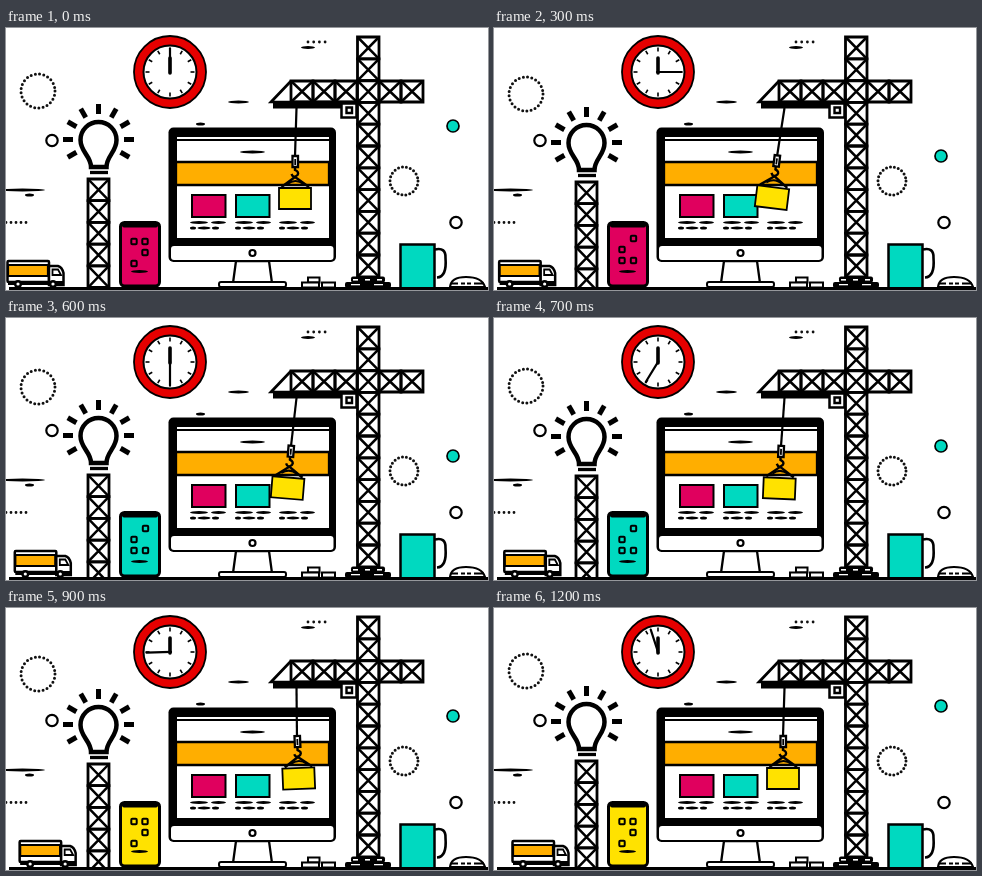
Write an HTML page with a canvas that moves like this. It is 482x262 px and loops after 1.3 s.

```html
<!DOCTYPE html>
<html lang="en">
<head>
<meta charset="utf-8">
<title>Under construction</title>
<style>
html, body { margin: 0; width: 100%; height: 100%; overflow: hidden; background: #fff; }
canvas { display: block; }
</style>
</head>
<body>
<canvas id="stage" width="482" height="262"></canvas>
<script>
const ctx = document.getElementById('stage').getContext('2d');
const INK = '#000', PINK = '#e0005e', TEAL = '#00d9c0', YELLOW = '#ffe200', ORANGE = '#ffae00', RED = '#e60000';
const STEP = 100, STEPS = 13, TAU = Math.PI * 2, RAD = Math.PI / 180;

// Values at every second step; the steps between are interpolated.
const HAND = [0, 64, 116, 180, 243, 294, 342];
const SWING = [0, 4.7, 9.3, 4.7, 0, -4.7, 0];
const DRIVE = [0, 2.3, 5, 7.3, 10.3, 14, 17];
const at = (keys, i) => {
  const k = Math.floor(i / 2);
  return i % 2 ? (keys[k] + keys[k + 1]) / 2 : keys[k];
};
// Rises by one per step up to the peak, then falls back to rest
const bounce = (i, peak) => Math.max(0, peak - Math.abs(i - peak));

function shape(d, fill, width = 2, stroke = INK) {
  const p = new Path2D(d);
  if (fill) { ctx.fillStyle = fill; ctx.fill(p); }
  if (width) { ctx.lineWidth = width; ctx.strokeStyle = stroke; ctx.stroke(p); }
}
function box(x, y, w, h, fill, width = 2, r = 0) {
  const p = new Path2D();
  p.roundRect(x, y, w, h, r);
  shape(p, fill, width);
}
function ring(x, y, r, fill, width = 2) {
  const p = new Path2D();
  p.arc(x, y, r, 0, TAU);
  shape(p, fill, width);
}
function dots(d, gap, size) {
  ctx.save();
  ctx.lineCap = 'round';
  ctx.setLineDash([0, gap]);
  shape(d, null, size, '#111');
  ctx.restore();
}
function dotRing(x, y, r, n) {
  const p = new Path2D();
  p.arc(x, y, r, 0, TAU);
  dots(p, TAU * r / n, 3);
}
// Pen dash that tapers at both ends
function dash(x, y, w, h = 3) {
  const p = new Path2D();
  p.ellipse(x + w / 2, y, w / 2, h / 2, 0, 0, TAU);
  p.rect(x + w * .15, y - h * .35, w * .7, h * .7);
  shape(p, INK, 0);
}
function spokes(x, y, from, to, angles, width) {
  for (const a of angles) {
    const s = Math.sin(a * RAD), c = -Math.cos(a * RAD);
    shape(`M${x + s * from} ${y + c * from}L${x + s * to} ${y + c * to}`, null, width);
  }
}
const range = (n, from, gap) => Array.from({ length: n }, (_, i) => from + i * gap);

function truss(x, y, w, h, n, down) {
  for (let i = 0; i < n; i++) {
    const l = x + (down ? 0 : i * w), t = y + (down ? i * h : 0);
    shape(`M${l} ${t}l${w} ${h}m0 ${-h}l${-w} ${h}`, null, 2.5);
    box(l, t, w, h, null, 2.8);
  }
}

function scenery(i) {
  dotRing(32, 63 + bounce(i, 6), 17, 25);
  dotRing(398, 153, 14, 22);
  dots('M0 194.5H23', 5, 2.8);
  dots('M302 14H321', 5.7, 2.8);
  ring(46, 112.5, 5.7, '#fff', 2.2);
  ring(450, 194.5, 5.7, '#fff', 2.2);
  ring(447, 98 + 10 * bounce(i, 5), 6, TEAL, 1.7);
  dash(-6, 162, 45);
  dash(19, 167, 9);
  dash(295, 19.5, 14);
  dash(222, 74, 21);
  dash(190, 96, 9);
}

function clock(angle) {
  ring(164, 44, 36, RED, 1.8);
  ring(164, 44, 26.5, '#fff', 2);
  spokes(164, 44, 20.5, 24.5, range(12, 0, 30), 1.6);
  ctx.lineCap = 'round';
  shape('M164 45V30', null, 3.6);
  spokes(164, 44, -1, 23.5, [angle], 2.2);
  ctx.lineCap = 'butt';
}

function monitor() {
  shape('M230 233H263L266 255H227Z', '#fff', 2.3);
  box(213, 254, 67, 5, '#fff', 2, 2);
  box(162.5, 99.5, 167.5, 134.5, INK, 0, 5);
  box(171, 109, 152, 101, '#fff', 0);
  box(165, 218, 162.5, 14, '#fff', 0, 3);
  shape('M171 112H323', null, 2);
  box(170, 134, 153, 23, ORANGE, 2.3);
  dash(234, 124, 25);
  ring(246.5, 225, 3, '#fff', 2.2);
  [[186, PINK], [230, TEAL]].forEach(([x, color]) => box(x, 167, 33.5, 22, color, 2));
  for (const x of [184, 229, 273]) {
    dash(x, 194.5, 18);
    dash(x + 21, 194.5, 15);
    dash(x, 200, 6);
    dash(x + 7.5, 200, 13);
    dash(x + 22, 200, 7);
  }
}

function crane() {
  truss(351.5, 9, 21.5, 21.8, 11, true);
  truss(285, 53, 22, 21, 3);
  truss(373, 53, 22, 21, 2);
  shape('M285 53L265 74H351M373 53H351', null, 2.7);
  box(267, 74, 69, 6.5, INK, 0);
  box(335.5, 75.5, 15, 14, '#fff', 2.5);
  box(340.5, 79.5, 5.5, 5.5, '#fff', 2.4);
  box(345, 248.5, 34, 6, INK, 0, 2);
  box(339, 254, 46, 6, INK, 0, 2);
  for (const x of [350, 362, 374]) box(x - 3, 251, 5, 1.6, '#fff', 0);
  for (const x of [345, 368]) box(x, 256, 9, 1.3, '#fff', 0);
}

function load(angle) {
  ctx.save();
  ctx.translate(290.5, 80);
  ctx.rotate(angle * RAD);
  shape('M0 0L-1.5 48', null, 2.2);
  box(-4, 48, 5.5, 11, '#fff', 2.3);
  shape('M-1.3 51V57', null, 1.8);
  shape('M-1.5 59V62Q3 64 1 67Q-3 71 -5 66M-1.5 69L-15 79M-1.5 69L12.5 79', null, 2.4);
  shape('M-9 76Q-1 70 7 76', null, 2);
  box(-17.5, 80, 32, 21, YELLOW, 1.8);
  ctx.restore();
}

function bulb(drop) {
  ctx.save();
  ctx.beginPath();
  ctx.rect(0, 0, 482, 260);
  ctx.clip();
  ctx.translate(0, drop);
  spokes(92.5, 111.5, 25.5, 35.5, range(9, -120, 30), 5);
  shape('M85 139C85 128 74.5 124 74.5 112A18 18 0 0 1 110.5 112C110.5 124 100.5 128 100.5 139Z', '#fff', 4.5);
  shape('M84 144.5H102', null, 3.3);
  truss(82, 151, 21, 21.7, 5, true);
  ctx.restore();
}

function phone(i) {
  const color = [PINK, TEAL, YELLOW][Math.min(2, Math.floor(i / 4))];
  box(114.5, 194.5, 39, 63.5, color, 3, 4);
  box(116, 194, 36, 5.5, INK, 0, 2);
  const icons = i % 4 < 2
    ? [[128, 213.5], [139, 213.5], [139, 224.5], [128, 235.5]]
    : [[139.5, 210.5], [128, 221.5], [128, 232.5], [139.5, 232.5]];
  for (const [x, y] of icons) box(x - 2.7, y - 2.7, 5.4, 5.4, color, 2, 1);
  dash(125, 243.5, 17, 2.8);
}

function truck(x) {
  ctx.save();
  ctx.translate(x, 0);
  box(1.5, 233, 41.5, 21, '#fff', 2.5, 1);
  box(2, 237, 40, 11, ORANGE, 2.2);
  shape('M43 238H52Q56 239 57.5 245V257H43Z', '#fff', 2.5);
  shape('M46.5 241.5H52L55 247H46.5Z', '#fff', 1.8);
  box(2, 253, 55, 4, INK, 0);
  for (const w of [12, 47]) ring(w, 256, 2.8, '#fff', 2.4);
  ctx.restore();
}

function desk() {
  box(302, 249.5, 11.5, 5, '#fff', 2);
  box(296, 254.5, 17, 5, '#fff', 2);
  box(316, 254.5, 13, 5, '#fff', 2);
  shape('M429 221.5Q440 219 439.5 230Q441 249 431 249.5', '#fff', 2.6);
  box(394.5, 216.5, 34, 44, TEAL, 2.5);
  shape('M444 259Q445 249 460 249Q476 249 479 259Z', '#fff', 2.2);
  shape('M445 255.5H452M455 255.5H459M461 255.5H465M468 255.5H478', null, 1.8);
  shape('M3 260.5H482', null, 3);
}

function draw(now) {
  const i = Math.floor(now / STEP) % STEPS;
  ctx.fillStyle = '#fff';
  ctx.fillRect(0, 0, 482, 262);
  scenery(i);
  clock(at(HAND, i));
  monitor();
  crane();
  load(at(SWING, i));
  bulb(bounce(i, 7));
  phone(i);
  truck(at(DRIVE, i));
  desk();
}

const start = performance.now();
function tick() {
  draw(performance.now() - start);
  requestAnimationFrame(tick);
}
tick();
</script>
</body>
</html>
```
